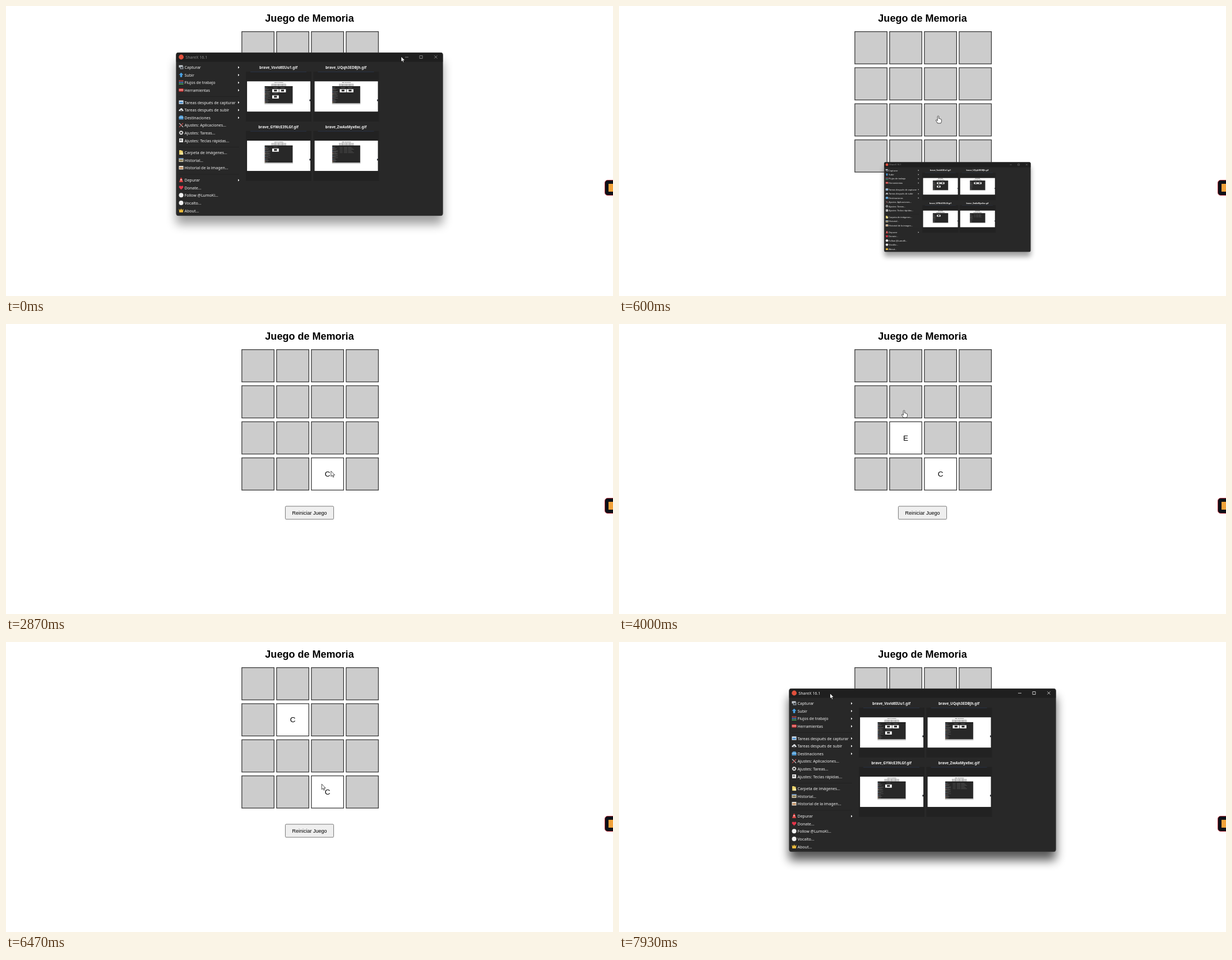
These frames come from a looping animation (1083x517 px, 8000 ms). An HTML page:

```html
<!DOCTYPE html>
<html lang="es">
<head>
<meta charset="utf-8">
<title>Juego de Memoria</title>
<style>
html, body { margin: 0; width: 100%; height: 100%; overflow: hidden; background: #fff; }
svg { display: block; width: 100vw; height: 100vh; }
text { font-family: "Liberation Sans", Arial, sans-serif; }
.ui text { font-family: "Noto Sans", "Open Sans", sans-serif; font-size: 7.05px; fill: #f2f2f2; }
.ui .cap { font-size: 6.5px; font-weight: 700; text-anchor: middle; }
.ui .bar { fill: #8a8a8a; }
.ui .btn { stroke: #9a9a9a; stroke-width: .8; fill: none; }
.ui.active .bar { fill: #f2f2f2; }
.ui.active .btn { stroke: #eee; }
.shade { opacity: .38; }
.active .shade { opacity: .66; }
.ui .mini { font: 700 18px "Liberation Sans", Arial, sans-serif; fill: #000; text-anchor: middle; }
</style>
</head>
<body>
<svg id="stage" viewBox="0 0 1083 517"></svg>
<script>
const $ = id => document.getElementById(id);
const rect = (x, y, w, h, fill, more = '') =>
  `<rect x="${x}" y="${y}" width="${w}" height="${h}" fill="${fill}" ${more}/>`;
const path = (d, fill, more = '') => `<path d="${d}" fill="${fill}" ${more}/>`;
const dot = (x, y, r, fill) => `<circle cx="${x}" cy="${y}" r="${r}" fill="${fill}"/>`;
const label = (x, y, s, more = '') => `<text x="${x}" y="${y}" ${more}>${s}</text>`;
const range = n => [...Array(n).keys()];

// Page
const SIZE = 58.7, colX = c => 420.2 + c * 62.04, rowY = r => 45.1 + r * 64.3;

function board() {
  return range(16).map(i => {
    const x = colX(i % 4), y = rowY(i >> 2);
    return rect(x + .6, y + .6, SIZE - 1.2, SIZE - 1.2, '#ccc',
        `id="cell${i}" stroke="#333" stroke-width="1.25"`) +
      label(x + SIZE / 2, y + SIZE / 2 + 4.7, '', `id="face${i}" font-size="13.55" text-anchor="middle"`);
  }).join('');
}

function page() {
  return rect(0, 0, 1083, 517, '#fff') +
    label(541.5, 28, 'Juego de Memoria', 'font-size="18.05" font-weight="700" text-anchor="middle"') +
    board() +
    rect(498.4, 324.9, 86.2, 23.2, '#efefef', 'rx="1.6" stroke="#767676"') +
    label(541.5, 339.6, 'Reiniciar Juego', 'font-size="9.03" text-anchor="middle"') +
    rect(1068.5, 310.5, 24, 27, '#0d1018', 'rx="5" stroke="#b8303c"') +
    rect(1075, 317, 14, 14, '#f2a23a');
}

// Menu icons, drawn around 0,0
const card = (a, b) => rect(-4, -3.2, 8, 6.4, a) + rect(-3, -1, 6, 3, b);
const icons = {
  shot: rect(-4, -3.5, 7, 4, '#cfd4da') + rect(-2, -1.5, 6, 5, '#8d949c') + dot(1, 1, 1.4, '#333'),
  up: path('M0-4L4 0H1.7V4H-1.7V0H-4Z', '#4aa3e6'),
  grid: range(9).map(i => rect(i % 3 * 2.8 - 3.8, (i / 3 | 0) * 2.8 - 3.8, 2, 2,
    ['#e04848', '#4a90e0', '#4cb85c'][(i / 3 | 0)])).join(''),
  box: rect(-4, -2.8, 8, 5.6, '#d63c3c') + rect(-4, -.6, 8, 1, '#f3d9d9'),
  pic: card('#dfe8f2', '#4a90d0'),
  cloud: path('M-4 2Q-4.5-.8-2-1Q-1-3.8 1.4-2.6Q2.4-2 2.6-.8Q4.6-.4 4 2Z', '#e6eaee') +
    path('M0-.5L2 1.6H.7V3.6H-.7V1.6H-2Z', '#555'),
  dest: path('M-4-1L-2-3.6H2.5L4-1V3.5H-4Z', '#4e9ad4') + rect(-4, -1, 8, 1, '#b9dcf3'),
  tools: path('M-3.5-3.5L3.5 3.5', 'none', 'stroke="#d8d8d8" stroke-width="1.2"') +
    path('M3.5-3.5L-3.5 3.5', 'none', 'stroke="#d05050" stroke-width="1.2"'),
  gear: '<circle r="2.4" fill="none" stroke="#e4e4e4" stroke-width="1.5"/>' +
    '<circle r="3.5" fill="none" stroke="#e4e4e4" stroke-width="1" stroke-dasharray="1.35 1.4"/>',
  key: rect(-3.5, -3.5, 7, 7, '#e6e6e6') + rect(-2, -2, 3, 3, '#777'),
  folder: path('M-3.5-4H0L1-3H3V4H-3.5Z', '#e8cf6a') + rect(-1, 0, 4.6, 4, '#f5e7a2'),
  log: card('#e7dfc4', '#8a7a52') + rect(-4, -3.2, 8, 1.4, '#5b8fd0'),
  album: card('#e9e4da', '#c08a5a'),
  cone: path('M-1-4H1L3.5 3.8H-3.5Z', '#df4444') + rect(-1.6, -1, 3.2, 1.2, '#fff'),
  heart: path('M0 3.8L-3.7 0Q-4.4-3-2-3.4Q-.6-3.4 0-2Q.6-3.4 2-3.4Q4.4-3 3.7 0Z', '#e5344a'),
  disc: dot(0, 0, 4, '#f0f0f0'),
  crown: path('M-4-3L-1.8-.5L0-3.6L1.8-.5L4-3L3.3 3.4H-3.3Z', '#e9b93c')
};
const groups = [
  [109.5, 'shot Capturar>', 'up Subir>', 'grid Flujos de trabajo>', 'box Herramientas>'],
  [172, 'pic Tareas después de capturar>', 'cloud Tareas después de subir>', 'dest Destinaciones>',
    'tools Ajustes: Aplicaciones...', 'gear Ajustes: Tareas...', 'key Ajustes: Teclas rápidas...'],
  [261.5, 'folder Carpeta de imágenes...', 'log Historial...', 'album Historial de la imagen...'],
  [310.6, 'cone Depurar>', 'heart Donate...', 'disc Follow @LumoKi...', 'disc Vocalto...', 'crown About...']
];
const tints = ['#8ab', '#4a9be0', '#c55', '#ccc', '#db6'];

function menu() {
  const rows = groups.map(([y0, ...items]) => items.map((item, i) => {
    const y = y0 + i * 13.58, cut = item.indexOf(' '), sub = item.endsWith('>');
    return `<g transform="translate(312.5 ${y - .4})">${icons[item.slice(0, cut)]}</g>` +
      label(318.5, y + 2.7, item.slice(cut + 1).replace('>', '')) +
      (sub ? path(`M414 ${y - 2.2}l2.3 2.2l-2.3 2.2Z`, '#fff') : '');
  }).join('')).join('');
  return rows + [161, 251, 299.5].map(y => rect(308, y, 108, .8, '#202020')).join('');
}

// Small picture of the whole page with n pictures in its window
function thumb(x, y, n) {
  const lines = groups.map(([y0, ...items]) => items.map((s, i) =>
    rect(308, y0 + i * 13.58 - 4, 9, 8, tints[i % 5]) +
    rect(319, y0 + i * 13.58 - 2, s.length * 2.6, 4, '#777')).join('')).join('');
  const shots = range(n).map(i => {
    const sx = 430 + i % 2 * 121, sy = 134 + (i >> 1) * 106;
    return rect(sx + 20, sy - 27, 72, 4, '#999') + rect(sx, sy, 113, 54, '#fff') +
      rect(sx + 31, sy + 9, 50, 30, '#282828');
  }).join('');
  const list = n ? '' : range(6).map(i => rect(430, 112 + i * 18, 50, 4, '#666') +
    rect(500, 112 + i * 18, 60, 4, '#777') + rect(572, 112 + i * 18, 60 + i % 3 * 20, 4, '#777')).join('');
  return `<g transform="translate(${x} ${y}) scale(.1043)">` + rect(0, 0, 1083, 517, '#fff') +
    label(541.5, 28, 'Juego de Memoria', 'class="mini"') +
    range(4).map(c => rect(colX(c), 45, SIZE, 50, '#ccc', 'stroke="#333" stroke-width="2"')).join('') +
    rect(298, 95, 487, 300, '#000', 'opacity=".2" rx="8"') +
    rect(303, 83, 476, 291, '#282828') + rect(303, 83, 476, 16, '#1d1d1d') +
    lines + shots + list + rect(1068, 310, 15, 28, '#0d1018') + '</g>';
}

function tile(i, name) {
  const x = 428 + i % 2 * 120.5, y = 117 + (i >> 1) * 105.8, n = 3 - i;
  return rect(x, y, 117, 89, '#222') + rect(x + 8, y, 100, .7, '#2c3a55') +
    thumb(x + 2.1, y + 17.3, n) +
    (name ? label(x + 58, y - 5, name, 'class="cap"') : '');
}

const names = ['brave_Vsvld6IUu1.gif', 'brave_UQqh3EDBJh.gif', 'brave_GYWcE39LGf.gif', 'brave_ZwAxMyx6xc.gif'];

function appWindow() {
  return `<g id="win" class="ui">` +
    rect(303.5, 98, 476, 291, '#000', 'class="shade" rx="4" filter="url(#soft)"') +
    rect(303.5, 83, 476, 291, '#282828', 'rx="4"') +
    path('M303.5 99.5V87q0-4 4-4H775.5q4 0 4 4V99.5Z', '#1f1f1f') +
    dot(312.6, 91, 4.4, '#e0503c') + label(320.3, 93.7, 'ShareX 16.1', 'class="bar"') +
    path('M712 91.2h6M738 88.5h5v5h-5ZM764.2 88.3l5.2 5.2m0-5.2l-5.2 5.2', 'none', 'class="btn"') +
    tile(0) + `<g id="content">` + menu() + names.map((s, i) => tile(i, s)).join('') + '</g>' +
    rect(303.8, 83.3, 475.4, 290.4, 'none', 'rx="4" stroke="#444" stroke-width=".6"') + '</g>';
}

$('stage').innerHTML =
  '<defs><filter id="soft" x="-20%" y="-20%" width="140%" height="140%"><feGaussianBlur stdDeviation="9"/></filter></defs>' +
  page() + appWindow() +
  '<g id="cursor" stroke="#000" stroke-width=".7" stroke-linejoin="round">' +
  path('M0 0V9.6L2.2 7.6L3.7 11L5.2 10.3L3.8 7.1H6.8Z', '#fff', 'id="arrow"') +
  path('M-1.2 1.2Q0-.6 1.2 1.2V5.2Q3 4.6 3.2 5.8Q4.6 5.4 4.8 6.6Q6 6.4 6 7.8V10Q5.6 12 4.6 13.5H-1.2' +
    'Q-2 11.5-3.6 9.4Q-4.6 7.6-3.2 7.4Q-2 7.6-1.2 9Z', '#fff', 'id="hand"') + '</g>';

// Timeline: [time, values...]
const trail = [
  [0, 705, 90], [66, 717, 96], [266, 717, 96], [467, 620, 160], [600, 569.5, 195.5], [733, 584, 216],
  [800, 584, 216], [1200, 541, 260], [1400, 540, 262], [1530, 546, 228], [1800, 546.4, 223],
  [2267, 594, 286], [2667, 589, 270], [2800, 589, 270], [3267, 525, 215], [3667, 516, 207],
  [4000, 508.5, 153.5], [4133, 507, 147], [4667, 507, 146], [4800, 497, 152], [5267, 563.3, 253.3],
  [6467, 563.3, 253.3], [6600, 590, 290], [6800, 690, 410], [7000, 820, 522], [7400, 680, 530],
  [7467, 660, 505], [7600, 581, 286.5], [7733, 480, 175], [7933, 376.5, 91.5]
];
const zoom = [
  [330, 1], [400, .985], [467, .93], [533, .78], [600, .549],
  [7533, .72], [7600, .866], [7667, .945], [7733, .985], [7800, 1]
];
// column, row, letter, shown from, until
const flips = [
  [1, 3, 'H', 1260, 2530], [2, 2, 'F', 1530, 2530], [2, 3, 'C', 2660, 4260],
  [1, 2, 'E', 3260, 4260], [1, 1, 'C', 4460, 8000], [2, 3, 'C', 5460, 8000]
];

function at(keys, t) {
  const i = keys.findIndex(k => k[0] > t);
  if (i < 1) return (i ? keys[keys.length - 1] : keys[0]).slice(1);
  const a = keys[i - 1], b = keys[i], p = (t - a[0]) / (b[0] - a[0]);
  return a.slice(1).map((v, j) => v + (b[j + 1] - v) * p);
}

const show = (id, on) => $(id).style.display = on ? '' : 'none';
const TICK = 200 / 3;

function draw(ms) {
  const t = Math.floor((ms + 5) / TICK) * TICK % 8000;

  const faces = Array(16).fill('');
  for (const [c, r, s, from, to] of flips) if (t >= from && t < to) faces[r * 4 + c] = s;
  faces.forEach((s, i) => {
    $('cell' + i).setAttribute('fill', s ? '#fff' : '#ccc');
    $('face' + i).textContent = s;
  });

  // The window shrinks into, and grows out of, one point on the bottom edge
  const [s] = at(zoom, t);
  show('win', t < 650 || t > 7530);
  show('content', t < 650 || t > 7650);
  $('win').classList.toggle('active', t > 7000);
  $('win').setAttribute('transform', `translate(679.5 516.5) scale(${s}) translate(-679.5 -516.5)`);

  const [x, y] = at(trail, t);
  const over = range(16).some(i => {
    const dx = x - colX(i % 4), dy = y - rowY(i >> 2);
    return !faces[i] && dx > 0 && dx < SIZE && dy > 0 && dy < SIZE;
  });
  const hand = over && t > 500 && t < 7400;
  show('hand', hand);
  show('arrow', !hand);
  $('cursor').setAttribute('transform', `translate(${x} ${y})`);
}

const start = performance.now();
function loop() {
  draw((performance.now() - start) % 8000);
  requestAnimationFrame(loop);
}
draw(0);
requestAnimationFrame(loop);
</script>
</body>
</html>
```
